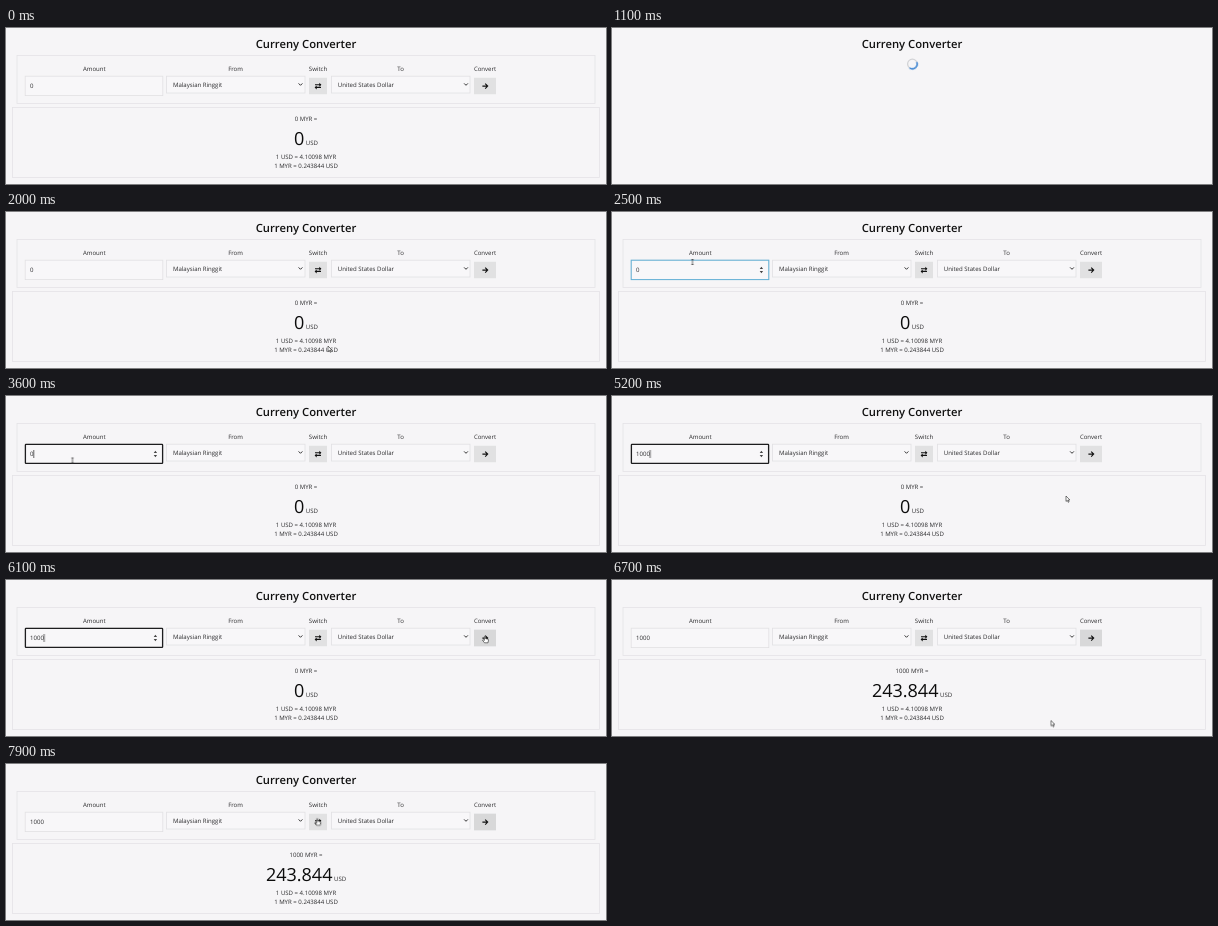
These frames come from a looping animation (600 px wide and 156 px high, 8000 ms). An HTML page:

```html
<!DOCTYPE html>
<html lang="en">
<head>
<meta charset="utf-8">
<title>Currency converter</title>
<style>
html, body { margin: 0; width: 100%; height: 100%; overflow: hidden; background: #f6f5f7; }
svg { display: block; width: 600px; height: 156px; }
text { font: 6.05px "Open Sans", "Noto Sans", sans-serif; fill: #2b2b2d; text-rendering: geometricPrecision; white-space: pre; }
.mid { text-anchor: middle; }
h1, .title { font-size: 11.25px; font-weight: 600; fill: #111; }
.big { font-size: 18px; fill: #0c0c0c; }
.box { fill: none; stroke: #e4e3e6; stroke-width: .8; }
.field { fill: #f8f7f9; stroke: #e1e0e3; stroke-width: .8; }
.btn { fill: #e1e1e2; }
.ring { fill: none; stroke: #62b0d6; stroke-width: 1; }
.icon { fill: none; stroke: #111; stroke-width: 1.1; }
.chev { fill: none; stroke: #333; stroke-width: 1; }

/* One loop is 8 s, so 1.25% is 100 ms. */
.t { animation: 8s step-end infinite; }
#form { animation-name: form; }
#loader { animation-name: loader; }
#hover { animation-name: hover; }
#focus { animation-name: focus; }
#steps { animation-name: steps; }
#pick { animation-name: pick; }
#mark { animation-name: mark; }
#zero { animation-name: zero; }
#d1 { animation-name: d1; }
#d2 { animation-name: d2; }
#d3 { animation-name: d3; }
#d4 { animation-name: d4; }
#caret { animation-name: caret; }
#before { animation-name: before; }
#after { animation-name: after; }
#press { animation-name: press; }
#arrow { animation-name: arrow; }
#beam { animation-name: beam; }
#hand { animation-name: hand; }
#mouse { animation: mouse 8s infinite; }
#arc { animation: spin 1s steps(10) infinite; transform-origin: 300.4px 36px; }

@keyframes form { 0%, 15% { visibility: visible } 6.25% { visibility: hidden } }
@keyframes loader { 0%, 15% { opacity: 0 } 6.25% { opacity: 1 } }
@keyframes hover { 0%, 45% { opacity: 0 } 31.25% { opacity: 1 } }
@keyframes focus { 0%, 80% { opacity: 0 } 45% { opacity: 1 } }
@keyframes steps { 0%, 80% { opacity: 0 } 31.25% { opacity: 1 } }
@keyframes pick { 0%, 56.25% { opacity: 0 } 53.75% { opacity: 1 } }
@keyframes mark { 0%, 55% { opacity: 0 } 47.5% { opacity: 1 } }
@keyframes zero { 0% { opacity: 1 } 55%, 100% { opacity: 0 } }
@keyframes d1 { 0% { opacity: 0 } 55%, 100% { opacity: 1 } }
@keyframes d2 { 0% { opacity: 0 } 56.25%, 100% { opacity: 1 } }
@keyframes d3 { 0% { opacity: 0 } 57.5%, 100% { opacity: 1 } }
@keyframes d4 { 0% { opacity: 0 } 60%, 100% { opacity: 1 } }
@keyframes caret {
  0%, 80% { opacity: 0; transform: none }
  45% { opacity: 1; transform: none }
  47.5% { opacity: 0; transform: none }
  55% { opacity: 1; transform: none }
  56.25% { opacity: 1; transform: translateX(3.46px) }
  57.5% { opacity: 1; transform: translateX(6.92px) }
  60%, 72.5% { opacity: 1; transform: translateX(10.38px) }
  66.25%, 78.75% { opacity: 0; transform: translateX(10.38px) }
}
@keyframes before { 0% { opacity: 1 } 81.25%, 100% { opacity: 0 } }
@keyframes after { 0% { opacity: 0 } 81.25%, 100% { opacity: 1 } }
@keyframes press { 0% { opacity: 0 } 75%, 100% { opacity: 1 } }
@keyframes arrow {
  0%, 31.25%, 75%, 96.25% { opacity: 0 }
  25%, 52.5%, 81.25% { opacity: 1 }
}
@keyframes beam { 0%, 52.5% { opacity: 0 } 31.25% { opacity: 1 } }
@keyframes hand { 0%, 81.25% { opacity: 0 } 75%, 96.25% { opacity: 1 } }
@keyframes spin { from { transform: rotate(0) } to { transform: rotate(360deg) } }
@keyframes mouse {
  0%, 25% { transform: translate(322px, 134px); animation-timing-function: steps(3) }
  28.75% { transform: translate(112px, 17px); animation-timing-function: steps(2) }
  31.25% { transform: translate(80.5px, 50px); animation-timing-function: steps(3) }
  35% { transform: translate(82px, 60px); animation-timing-function: steps(3) }
  38.75%, 45% { transform: translate(66.5px, 64.5px); animation-timing-function: steps(3) }
  48.75%, 50% { transform: translate(14px, 62px); animation-timing-function: steps(4) }
  55% { transform: translate(262px, 65px); animation-timing-function: steps(6) }
  62.5% { transform: translate(464px, 105px); animation-timing-function: steps(2) }
  65% { transform: translate(454px, 100px); animation-timing-function: steps(2) }
  67.5%, 68.75% { transform: translate(468px, 88px); animation-timing-function: steps(3) }
  72.5% { transform: translate(501px, 84px); animation-timing-function: steps(3) }
  76.25%, 80% { transform: translate(479px, 56px); animation-timing-function: steps(3) }
  83.75% { transform: translate(439px, 140.5px); animation-timing-function: steps(6) }
  91.25% { transform: translate(364px, 112px); animation-timing-function: steps(5) }
  97.5%, 100% { transform: translate(311.3px, 54.5px) }
}
</style>
</head>
<body>
<svg viewBox="0 0 600 156">
  <text class="title mid" x="300" y="20">Curreny Converter</text>

  <g id="loader" class="t" fill="none" stroke-width="1.3">
    <circle cx="300.4" cy="36" r="4.8" stroke="#d2d3d6"/>
    <path id="arc" d="M302.8 31.85A4.8 4.8 0 0 1 300.4 40.8" stroke="#2f7fd6"/>
  </g>

  <g id="form" class="t">
    <rect class="box" x="11" y="27.5" width="578" height="48"/>
    <rect class="box" x="6.5" y="79.5" width="587" height="70"/>

    <g class="mid">
      <text x="88.3" y="43">Amount</text>
      <text x="229.5" y="43">From</text>
      <text x="312" y="43">Switch</text>
      <text x="394.5" y="43">To</text>
      <text x="479" y="43">Convert</text>
    </g>

    <rect class="field" x="19.2" y="48.2" width="137.6" height="19.4"/>
    <rect class="field" x="160.5" y="48.2" width="138.5" height="16.8"/>
    <rect class="field" x="325.5" y="48.2" width="138.5" height="16.8"/>
    <text x="167" y="59">Malaysian Ringgit</text>
    <text x="331.8" y="59">United States Dollar</text>
    <path class="chev" d="M292.6 55.4l1.9 1.9 1.9-1.9M458.1 55.4l1.9 1.9 1.9-1.9"/>

    <rect class="btn" x="303" y="49.8" width="18" height="16.4"/>
    <rect class="btn" x="468" y="49.8" width="22" height="16.4"/>
    <rect id="press" class="t" x="468" y="49.8" width="22" height="16.4" fill="#d8d8d9"/>
    <path class="icon" stroke-width=".9" d="M309 56.8h5.6M315 59.4h-5.6"/>
    <path fill="#111" d="M313.3 54.8l2.1 2-2.1 2zM310.7 57.4l-2.1 2 2.1 2z"/>
    <path class="icon" d="M476.4 58.1h5M479.2 55.6l2.5 2.5-2.5 2.5"/>

    <rect id="hover" class="t ring" x="19.2" y="48.2" width="137.6" height="19.4"/>
    <rect id="pick" class="t ring" x="160.5" y="48.2" width="138.5" height="16.8"/>
    <rect id="focus" class="t" x="19.4" y="48.4" width="137.2" height="19" rx=".6" fill="none" stroke="#1d1d1f" stroke-width="1.3"/>
    <path id="steps" class="t" fill="#444" d="M147.7 56.9l1.7-2.2 1.7 2.2zM147.7 59.1l1.7 2.2 1.7-2.2z"/>

    <rect id="mark" class="t" x="24" y="54" width="3.6" height="8" fill="#8fc0f0"/>
    <text id="zero" class="t" x="24" y="60.4">0</text>
    <text id="d1" class="t" x="24" y="60.4">1</text>
    <text id="d2" class="t" x="27.46" y="60.4">0</text>
    <text id="d3" class="t" x="30.92" y="60.4">0</text>
    <text id="d4" class="t" x="34.38" y="60.4">0</text>
    <rect id="caret" class="t" x="27.5" y="54" width=".7" height="8" fill="#222"/>

    <g id="before" class="t mid">
      <text x="300" y="93">0 MYR =</text>
      <text x="300" y="117.4"><tspan class="big">0</tspan> USD</text>
    </g>
    <g id="after" class="t mid">
      <text x="300" y="93">1000 MYR =</text>
      <text x="300" y="117.4"><tspan class="big">243.844</tspan> USD</text>
    </g>
    <g class="mid">
      <text x="300" y="131">1 USD = 4.10098 MYR</text>
      <text x="300" y="140.4">1 MYR = 0.243844 USD</text>
    </g>
  </g>

  <g id="mouse">
    <path id="arrow" class="t" d="M0 0v5.4l1.3-1.1.9 2 .9-.4-.9-1.9h1.7z" fill="#fff" stroke="#222" stroke-width=".6"/>
    <path id="beam" class="t" d="M-1.1-2.5h2.2M0-2.5v5M-1.1 2.5h2.2" fill="none" stroke="#333" stroke-width=".7"/>
    <path id="hand" class="t" d="M-.6.4q.6-.8 1.2 0v2.2l2.4.6q.6.2.5.9l-.5 2.7h-3.5l-2-2.6q.3-.9 1.9.2z" fill="#fff" stroke="#222" stroke-width=".6"/>
  </g>
</svg>
</body>
</html>
```
